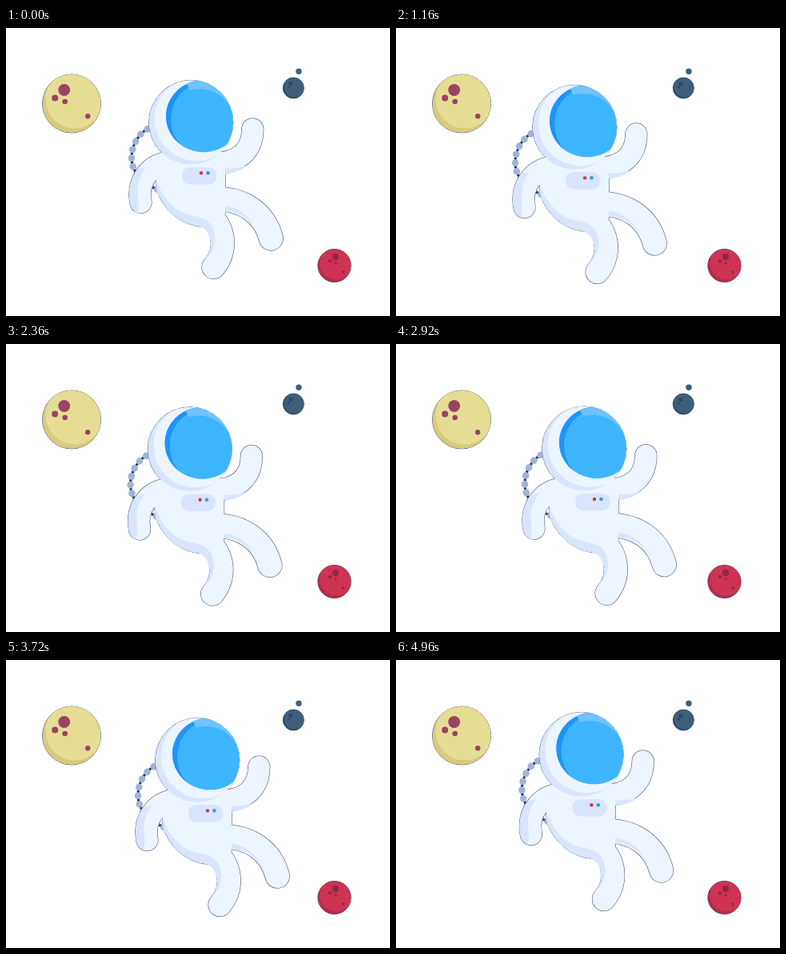
An HTML page with a canvas that plays this animation: 480 by 360 pixels, repeating every 5000 ms.

```html
<!DOCTYPE html>
<html lang="en">
<head>
<meta charset="utf-8">
<title>Floating astronaut</title>
<style>
  html, body { margin: 0; width: 100%; height: 100%; overflow: hidden; background: #fff; }
  canvas { display: block; width: 480px; height: 360px; }
</style>
</head>
<body>
<canvas id="stage" width="480" height="360"></canvas>
<script>
const ctx = document.getElementById('stage').getContext('2d');
const LOOP = 5000, STEP = 40;
const SUIT = '#ecf4fe', SHADE = '#d9e5fd', EDGE = '#3a4164';

const torso = new Path2D('M198 154C187 173 184 196 192 211C202 232 222 246 243 248L268 243L274 232V160Z');
const limbs = [
  { path: new Path2D('M252 234C268 240 281 274 259.5 299'), width: 29 },
  { path: new Path2D('M262 213.5C296 213.5 323 231 331.3 263'), width: 30 },
  { path: new Path2D('M260 169C291 169 308.3 153 308.3 126.5'), width: 27 },
  { path: new Path2D('M206 168C182 168 163 190 168.5 218'), width: 27 }
];
const shades = [
  // belly and left leg
  new Path2D('M188 191C187 200 188 205 192 211C202 232 222 246 241 247.5C250 250 256 259 256 270' +
    'C256 279 252 285 248 290C258 281 262 272 261 260C260 245 250 237 235 235C214 232 198 217 188 191Z'),
  // right leg
  new Path2D('M274 229C292 228 306 240 314 255C305 235 290 224 274 223Z'),
  // raised arm
  new Path2D('M274 182C284 182 295 178 303 171C293 175 284 176 274 175Z'),
  // lowered arm
  new Path2D('M165 176C155 188 152.5 203 155 219C156 225 160 229 164 230.5' +
    'C168 218 162 205 166 192C167 186 170 180 175 174Z')
];
const chain = new Path2D('M177 126C165 133 157 147 157 162C157 180 170 194 192 203');

const helmet = disc(231.3, 118, 52.6);
const visor = disc(247, 110.3, 47, 45);
const glint = new Path2D('M221 60H290V119H250Z');

function disc(x, y, rx, ry = rx) {
  const p = new Path2D();
  p.ellipse(x, y, rx, ry, 0, 0, Math.PI * 2);
  return p;
}

// Everything outside the given shape
function outside(shape) {
  const p = new Path2D();
  p.rect(0, 0, 480, 360);
  p.addPath(shape);
  return p;
}

function fill(path, color, rule = 'nonzero') {
  ctx.fillStyle = color;
  ctx.fill(path, rule);
}

function line(path, width, color) {
  ctx.lineWidth = width;
  ctx.strokeStyle = color;
  ctx.stroke(path);
}

function clipped(path, draw) {
  ctx.save();
  ctx.clip(path);
  draw();
  ctx.restore();
}

function planet(x, y, r, base, shade, spot, craters) {
  const ball = disc(x, y, r);
  line(ball, 1, EDGE);
  fill(ball, shade);
  clipped(ball, () => fill(disc(x + r * 0.11, y - r * 0.15, r), base));
  for (const [cx, cy, cr] of craters) fill(disc(cx, cy, cr), spot);
}

function drawPlanets() {
  planet(82, 94.5, 36.4, '#e6dd94', '#d6cb7d', '#9c4264',
    [[72.7, 77.5, 7.4], [61.2, 87.5, 4], [73.7, 92, 3.3], [102.2, 110.2, 3.2]]);
  planet(359.3, 75, 13, '#3e5f7b', '#344f6b', '#304a66',
    [[356, 69.5, 2.6], [353.3, 74, 1.7]]);
  fill(disc(366, 54.2, 3.7), '#3e5f7b');
  planet(410.5, 297, 20.6, '#ce3354', '#b22b4c', '#94264a',
    [[412, 286, 4.2], [405, 291.3, 2.1], [412.2, 293.8, 1.6], [421.3, 305, 1.7]]);
}

function drawChain() {
  line(chain, 3, '#20243a');
  ctx.setLineDash([0.6, 10.2]);
  line(chain, 8.4, '#a2b3da');
  ctx.setLineDash([]);
}

function drawSuit() {
  line(torso, 1, EDGE);
  line(helmet, 1, EDGE);
  for (const { path, width } of limbs) line(path, width + 1, EDGE);
  fill(torso, SUIT);
  for (const { path, width } of limbs) line(path, width, SUIT);
  for (const path of shades) fill(path, SHADE);

  const panel = new Path2D();
  panel.roundRect(220, 174, 43.5, 21.5, 10);
  fill(panel, SHADE);
  fill(disc(244, 181.3, 2.2), '#d2364a');
  fill(disc(252.4, 181.3, 2.3), '#2d9cec');
}

function drawHelmet() {
  fill(helmet, SHADE);
  clipped(helmet, () => {
    fill(disc(238.5, 113.5, 52.6), SUIT);
    fill(visor, '#3eb5ff');
    clipped(visor, () => {
      fill(outside(disc(250, 114, 44, 46)), '#1e94fa', 'evenodd');
      clipped(glint, () => fill(outside(disc(242, 119.5, 43.5)), '#6fc3ff', 'evenodd'));
    });
  });
}

function frame(now) {
  const t = Math.floor((now % LOOP) / STEP) * STEP;
  const a = t / LOOP * Math.PI * 2;
  ctx.fillStyle = '#fff';
  ctx.fillRect(0, 0, 480, 360);
  drawPlanets();
  ctx.save();
  ctx.lineCap = 'round';
  ctx.translate(-8 * Math.sin(a), 6.8 * (1 - Math.cos(a)));
  drawChain();
  drawSuit();
  drawHelmet();
  ctx.restore();
}

const start = performance.now();
function tick() {
  frame(performance.now() - start);
  requestAnimationFrame(tick);
}
tick();
</script>
</body>
</html>
```
